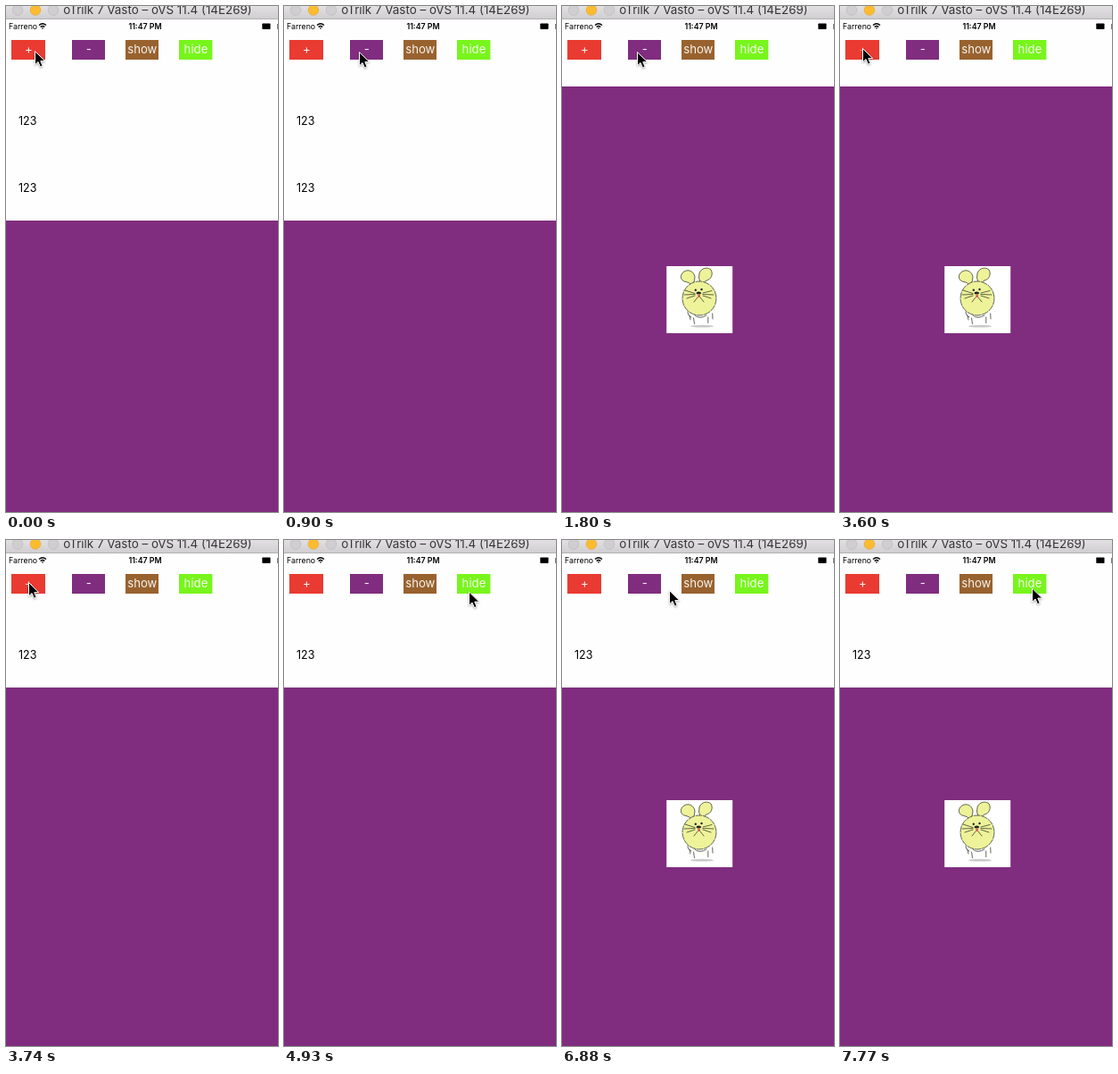
An HTML page for the animation above (8000 ms loop, 305x566 px).

```html
<!DOCTYPE html>
<html lang="en">
<head>
<meta charset="utf-8">
<title>Stack view demo</title>
<style>
  html, body { margin: 0; width: 100%; height: 100%; overflow: hidden; background: #fff; }
  svg { display: block; width: 305px; height: 566px; font-family: Inter, "Open Sans", sans-serif; }
  .button { font-size: 13.2px; fill: #fff; fill-opacity: .92; text-anchor: middle; }
  .row { font-size: 12.5px; fill: #000; }
  .ink { fill: none; stroke: #3c4030; stroke-width: .8; stroke-linecap: round; }
  #cursor { filter: drop-shadow(0 1px 1px #0005); }
</style>
</head>
<body>
<svg viewBox="0 0 305 566">
  <defs>
    <linearGradient id="bar" x2="0" y2="1">
      <stop stop-color="#e2e0e2"/><stop offset="1" stop-color="#d0ced0"/>
    </linearGradient>
  </defs>
  <rect width="305" height="566" fill="#fefefe"/>

  <!-- Window title -->
  <rect width="305" height="14" fill="url(#bar)"/>
  <rect y="14" width="305" height="1" fill="#b3b1b3"/>
  <g fill="#d0ced0" stroke="#bdbbbd" stroke-width=".8">
    <circle cx="13" cy="4.5" r="5.8"/>
    <circle cx="33" cy="4.5" r="5.8" fill="#fdbc2f" stroke="#e6a935"/>
    <circle cx="53" cy="4.5" r="5.8"/>
  </g>
  <text x="170" y="9" font-size="13.4" text-anchor="middle" fill="#363436">oTrilk 7 Vasto – oVS 11.4 (14E269)</text>

  <!-- Status bar -->
  <text x="3" y="26" font-size="8.8">Farreno</text>
  <g fill="none" stroke="#000" stroke-width="1.3">
    <path d="M37 21.6Q41 18 45 21.6M38.7 23.5Q41 21.4 43.3 23.5"/>
    <path d="M41 26L39.9 24.8Q41 23.8 42.1 24.8Z" fill="#000" stroke="none"/>
  </g>
  <text x="156" y="26" font-size="8.8" font-weight="600" text-anchor="middle">11:47 PM</text>
  <rect x="287.3" y="19.5" width="9.2" height="6.5" rx=".8"/>
  <rect x="304" y="20" width="1" height="6" fill="#777"/>

  <g id="buttons"></g>
  <text class="row" x="14" y="132.5">123</text>
  <text class="row" x="14" y="207.5">123</text>
  <rect id="panel" width="305" height="566" fill="#802d7f"/>

  <!-- Picture -->
  <g id="picture">
    <rect x="117.2" y="291" width="74" height="75" fill="#fff"/>
    <ellipse cx="157" cy="358.2" rx="13" ry="1.4" fill="#c9c9c9"/>
    <path class="ink" d="M141 342Q141 347 145 348M143 346L144 351M147.5 349L148.5 355.5M163.8 348V354.5M168.7 344L169 350M149 346Q154 351 162 346"/>
    <g class="ink" style="fill:#eef39a">
      <path d="M147 311Q149 307 149 303C148 297 142 294 137 297C131 301 133 308 139 308.5Q143 309 145 312Z"/>
      <path d="M155 309Q152.5 304 154 299C156 293 163 291.5 167 295C170 300 167 306 162 307Q159 308 159.5 311Z"/>
      <circle cx="154" cy="327" r="19" stroke-dasharray="7 1.5"/>
    </g>
    <path d="M146 312L148 309.5H156.5L159 311L156 315H149Z" fill="#eef39a"/>
    <g fill="#222">
      <circle cx="149.8" cy="317.7" r="1.2"/>
      <circle cx="156.5" cy="317" r="1.2"/>
      <ellipse cx="153.3" cy="321" rx="2.8" ry="1.5"/>
    </g>
    <ellipse cx="153.6" cy="324.4" rx="1.5" ry="1.8" fill="#d6605c"/>
    <path class="ink" d="M149 321.5L138 318M149 322.5L137 323M149 324L140 327M158 321L168 318.5M158 322.5L170 323M158 324L167 327M152 326L148 331M155 326L159 331"/>
  </g>

  <path id="cursor" d="M.5.6V15.8L4 12.5L6.5 18.2L9.1 17.1L6.8 11.6H11.8Z" stroke="#fff" stroke-width="1"/>
</svg>
<script>
const $ = id => document.getElementById(id);
const LOOP = 8000, TICK = 149.35;

// [label, x, width, colour]
const buttons = [
  ["+", 6, 38, "#e93b31"], ["-", 74, 37, "#802d7f"],
  ["show", 134, 37, "#98622f"], ["hide", 194, 37.4, "#78f51c"]
];
$("buttons").innerHTML = buttons.map(([label, x, w, color]) =>
  `<rect x="${x}" y="38" width="${w}" height="22" fill="${color}"/>
   <text class="button" x="${x + w / 2 + .3}" y="53.4">${label}</text>`).join("");
const plus = document.querySelector(".button");

// Pointer waypoints: [tick, x, y]
const path = [
  [1, 32, 50], [6, 84, 51], [20, 84, 51], [24, 25, 47], [27, 25, 47],
  [30, 110, 40], [33, 207, 57.5], [35, 160, 54], [37, 157, 50], [44, 157, 50],
  [46, 120, 56], [47, 120, 56], [48, 106, 56], [52, 215, 53.5]
];

function pointer(tick) {
  const i = path.findIndex(p => p[0] >= tick);
  if (i < 0) return path[path.length - 1].slice(1);
  if (i === 0) return path[0].slice(1);
  const [t0, x0, y0] = path[i - 1], [t1, x1, y1] = path[i];
  const u = (tick - t0) / (t1 - t0), e = u * u * (3 - 2 * u);
  return [x0 + (x1 - x0) * e, y0 + (y1 - y0) * e];
}

function draw(now) {
  const tick = Math.floor(now % LOOP / TICK);
  const rows = tick < 7 ? 2 : tick < 12 || tick >= 25 ? 1 : 0;
  const pictured = tick >= 12 && tick < 25 || tick >= 39;
  $("panel").setAttribute("y", 90 + 75 * rows);
  $("picture").style.display = pictured ? "" : "none";
  plus.style.opacity = tick === 24 ? .4 : 1;
  $("cursor").setAttribute("transform", `translate(${pointer(tick)})`);
  requestAnimationFrame(draw);
}
requestAnimationFrame(draw);
</script>
</body>
</html>
```
